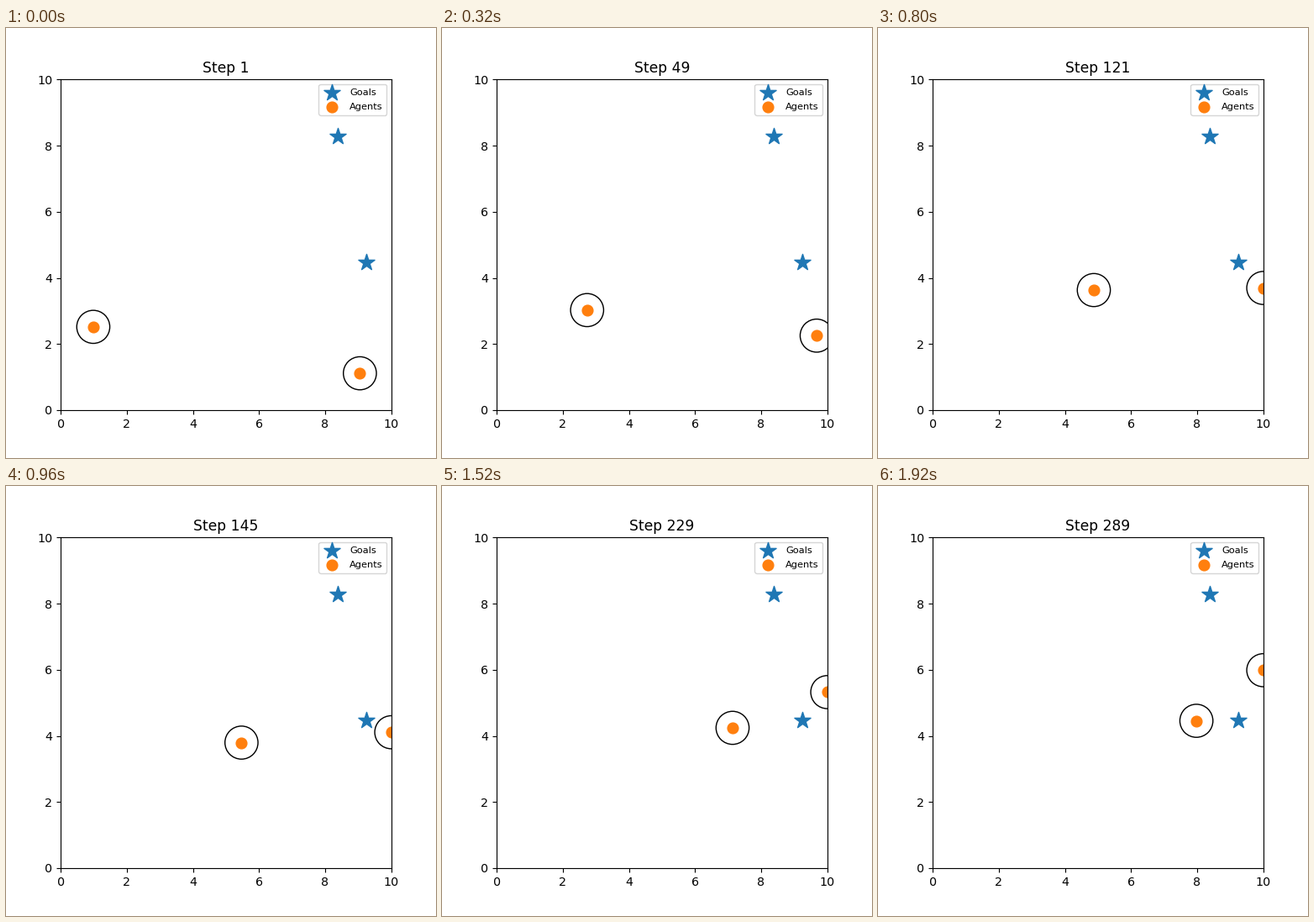
Recreate the animation shown at these times as a matplotlib script. Size 512 px wide and 512 px high, loop 2 s.

```python
import matplotlib.pyplot as plt
from matplotlib.animation import FuncAnimation
from matplotlib.patches import Circle

FRAMES, INTERVAL, STRIDE = 25, 80, 12
SIZE = 10
RADIUS = 0.5


def ease_out(start, span, duration, step):
    """Cubic deceleration from start, beginning at step 1."""
    rest = 1 - (step - 1) / duration
    return start + span * (1 - rest ** 3)


def positions(step):
    left = (ease_out(0.982, 8.39, 640, step), ease_out(2.518, 2.222, 580, step))
    y = ease_out(1.113, 6.41, 760, step)
    x = min(9.05 + 0.552 * (y - 1.113), SIZE)  # stopped by the wall
    return [left, (x, y)]


fig, ax = plt.subplots(figsize=(5, 5), dpi=102.4)
fig.subplots_adjust(left=0.1275, right=0.896, bottom=0.1115, top=0.88)
ax.set(xlim=(0, SIZE), ylim=(0, SIZE), aspect="equal")

start = positions(1)
ax.scatter([8.39, 9.24], [8.28, 4.48], marker="*", s=200, label="Goals")
agents = ax.scatter(*zip(*start), s=80, label="Agents")
rings = [ax.add_patch(Circle(p, RADIUS, fill=False)) for p in start]
title = ax.set_title("Step 1")
ax.legend(loc="upper right", fontsize=8, labelspacing=0.65)


def update(i):
    step = 1 + STRIDE * i
    points = positions(step)
    agents.set_offsets(points)
    for ring, point in zip(rings, points):
        ring.center = point
    title.set_text(f"Step {step}")
    return [agents, title, *rings]


anim = FuncAnimation(fig, update, frames=FRAMES, interval=INTERVAL,
                     repeat=True, repeat_delay=0, blit=False)
plt.show()
```
